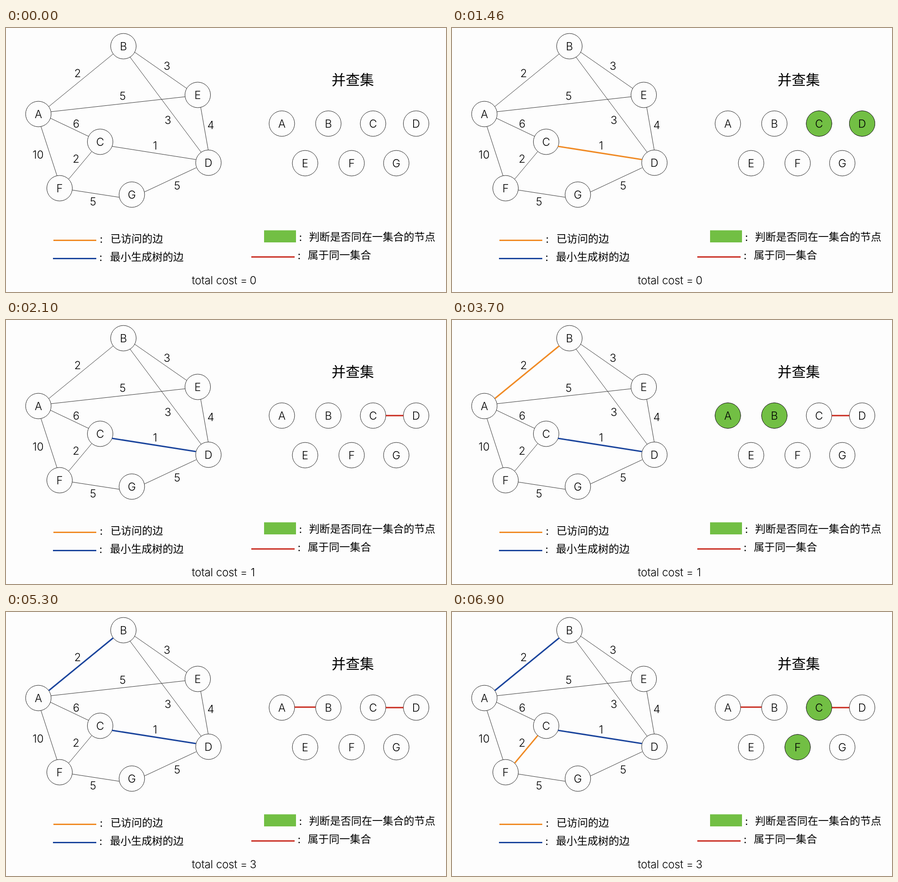
An HTML page that plays this animation: 965x580 px, repeating every 8 s.

```html
<!DOCTYPE html>
<html lang="zh-CN">
<head>
<meta charset="utf-8">
<title>Kruskal</title>
<style>
html, body { margin: 0; width: 100%; height: 100%; overflow: hidden; background: #fdfdfd; }
svg { display: block; width: 965px; height: 580px; }
text { font: 300 24px Inter, "Liberation Sans", sans-serif; fill: #000; }
.mid { text-anchor: middle; }
.cjk { font: 500 23.1px "Noto Sans CJK SC", "Noto Sans CJK", sans-serif; }
.title { font-size: 31px; }
.cost { letter-spacing: -.15px; }
.edge { stroke: #333; stroke-width: 1; }
.node { fill: #fdfdfd; stroke: #222; stroke-width: 1; }
.orange { stroke: #f08a24; stroke-width: 3; }
.blue { stroke: #1a449c; stroke-width: 3; }
.red { stroke: #c8281c; stroke-width: 3; }
.green { fill: #72bf44; }

/* Step boundaries: 500, 2100, 3700, 5300 and 6900 ms of 8000 */
[class*="on-"] { visibility: hidden; animation: 8s step-end infinite; }
.on-check1 { animation-name: check1; }
.on-join1 { animation-name: join1; }
.on-check2 { animation-name: check2; }
.on-join2 { animation-name: join2; }
.on-check3 { animation-name: check3; }
.on-cost0 { animation-name: cost0; }
.on-cost1 { animation-name: cost1; }
@keyframes check1 { 0%, 26.25%, 100% { visibility: hidden } 6.25% { visibility: visible } }
@keyframes join1 { 0% { visibility: hidden } 26.25%, 100% { visibility: visible } }
@keyframes check2 { 0%, 66.25%, 100% { visibility: hidden } 46.25% { visibility: visible } }
@keyframes join2 { 0% { visibility: hidden } 66.25%, 100% { visibility: visible } }
@keyframes check3 { 0% { visibility: hidden } 86.25%, 100% { visibility: visible } }
@keyframes cost0 { 0% { visibility: visible } 26.25%, 100% { visibility: hidden } }
@keyframes cost1 { 0%, 66.25%, 100% { visibility: hidden } 26.25% { visibility: visible } }
</style>
</head>
<body>
<svg id="stage" viewBox="0 0 965 580"></svg>
<script>
const line = (cls, [x1, y1, x2, y2]) =>
  `<line class="${cls}" x1="${x1}" y1="${y1}" x2="${x2}" y2="${y2}"/>`;
const text = (cls, x, y, s) => `<text class="${cls}" x="${x}" y="${y}">${s}</text>`;
const node = (cls, [x, y]) => `<circle class="${cls}" cx="${x}" cy="${y}" r="28"/>`;
const label = (name, [x, y]) => text('mid', x, y + 8.5, name);

const graph = {
  A: [71, 189], B: [257.5, 40], C: [206.5, 250], D: [444, 296],
  E: [420.5, 147], F: [117.5, 352], G: [276, 366]
};
const sets = {
  A: [605, 210], B: [707, 210], C: [805, 210], D: [899.5, 210],
  E: [656, 297], F: [758, 297], G: [856, 297]
};
// Edge ends, then weight and its centre
const edges = {
  AB: [[94, 172.5, 235, 57], 2, 157, 99],
  AE: [[98, 184, 393, 151], 5, 256, 149],
  AC: [[97, 198, 181, 238], 6, 154, 210],
  AF: [[76.5, 216, 112, 325], 10, 70.5, 278],
  BE: [[282, 53, 396, 132.5], 3, 353, 83],
  BD: [[272, 64, 428, 273], 3, 355, 202],
  ED: [[427, 174, 443.5, 268], 4, 449, 213],
  CD: [[232.5, 260, 416.5, 289], 1, 327, 258],
  CF: [[188, 271.5, 137.5, 332], 2, 153.5, 287],
  FG: [[145, 356, 249, 372], 5, 191, 381],
  GD: [[303, 360.5, 417, 307], 5, 375.5, 346]
};

// Edge, when it is checked, when it joins the tree, link between sets
const steps = [
  ['CD', 'check1', 'join1', [833, 210, 871.5, 210]],
  ['AB', 'check2', 'join2', [633, 209, 679, 209]],
  ['CF', 'check3']
];

let out = '';
for (const [ends, weight, x, y] of Object.values(edges))
  out += line('edge', ends) + text('mid', x, y + 8.5, weight);
for (const [name, at] of Object.entries(graph)) out += node('node', at) + label(name, at);
for (const at of Object.values(sets)) out += node('node', at);

for (const [key, check, join, link] of steps) {
  out += line(`orange on-${check}`, edges[key][0]);
  for (const name of key) out += node(`node green on-${check}`, sets[name]);
  if (join) out += line(`blue on-${join}`, edges[key][0]) + line(`red on-${join}`, link);
}
for (const [name, at] of Object.entries(sets)) out += label(name, at);

out += text('cjk title mid', 760.5, 125, '并查集')
  + line('orange', [104, 466.5, 198, 466.5])
  + line('blue', [103, 506.5, 198, 506.5])
  + line('red', [538, 503, 633, 503])
  + '<rect class="green" x="566" y="444.5" width="70" height="26.5"/>';
const legend = [
  [209, 229, 470.5, '已访问的边'],
  [208, 228, 510.5, '最小生成树的边'],
  [646, 664.5, 467, '判断是否同在一集合的节点'],
  [643, 662, 507, '属于同一集合']
];
for (const [colon, x, y, words] of legend)
  out += text('cjk mid', colon, y + 1, ':') + text('cjk', x, y, words);

out += text('cost', 407.5, 563, 'total cost =')
  + text('mid on-cost0', 542, 563, 0)
  + text('mid on-cost1', 541.5, 563, 1)
  + text('mid on-join2', 542, 563, 3);
document.getElementById('stage').innerHTML = out;
</script>
</body>
</html>
```
